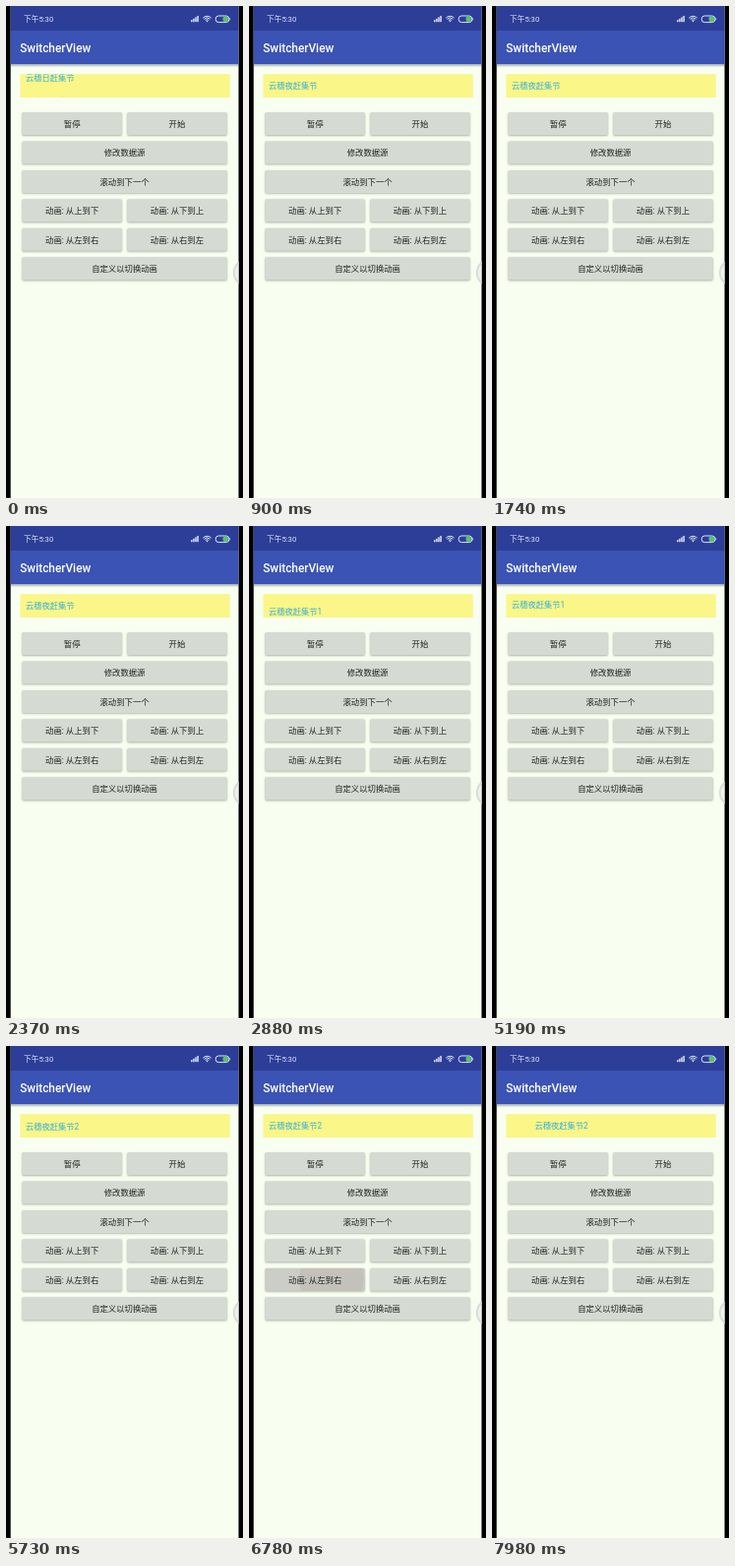
These frames come from a looping animation (241 by 500 pixels, 8000 ms). An HTML page with a canvas:

```html
<!DOCTYPE html>
<html lang="zh-CN">
<head>
<meta charset="utf-8">
<title>SwitcherView</title>
<style>
html, body { margin: 0; width: 100%; height: 100%; overflow: hidden; background: #000; }
canvas { display: block; width: 241px; height: 500px; }
</style>
</head>
<body>
<canvas id="stage" width="241" height="500"></canvas>
<script>
const ctx = document.getElementById('stage').getContext('2d');
const LOOP = 8000;
const FONT = 'Roboto, "Noto Sans CJK SC", "Noto Sans CJK", sans-serif';
const SCREEN = { x: 4.7, w: 231.8 };

// Rolling text: one switch every PERIOD ms, each taking SLIDE ms.
const FIRST = -270, PERIOD = 2700, SLIDE = 700;
const BOX = { x: 14.4, y: 69.2, w: 213.3, h: 23.8 };
const ITEMS = ['云穗日赶集节', '云穗夜赶集节', '云穗夜赶集节1', '云穗夜赶集节2', '云穗夜赶集节3'];

const ROWS = [
  ['暂停', '开始'],
  ['修改数据源'],
  ['滚动到下一个'],
  ['动画: 从上到下', '动画: 从下到上'],
  ['动画: 从左到右', '动画: 从右到左'],
  ['自定义以切换动画']
];
const ROW_TOP = 108, ROW_STEP = 29.45;
const TAPS = [
  { row: 1, x: 90, start: 1860, spread: 110 },
  { row: 4, x: 84, start: 6560, spread: 66 }
];
const TAP_TIME = 500;

const clamp = v => Math.max(0, Math.min(1, v));
const ease = v => (1 - Math.cos(Math.PI * clamp(v))) / 2;

function rect(x, y, w, h, color) {
  ctx.fillStyle = color;
  ctx.fillRect(x, y, w, h);
}

function band(y, h, color) {
  rect(SCREEN.x, y, SCREEN.w, h, color);
}

function round(x, y, w, h, r) {
  ctx.beginPath();
  ctx.roundRect(x, y, w, h, r);
}

function text(str, x, y, size, color, align = 'left', weight = 400) {
  ctx.font = `${weight} ${size}px ${FONT}`;
  ctx.textAlign = align;
  ctx.textBaseline = 'alphabetic';
  ctx.fillStyle = color;
  ctx.fillText(str, x, y);
}

function statusBar() {
  const white = '#dfe4f5';
  band(0, 25, '#2c3e98');
  text('下午5:30', 18, 16, 7.7, '#e4e8f6');

  for (let i = 0; i < 4; i++) {
    const h = 2 + i * 1.4;
    rect(188 + i * 2.1, 16.2 - h, 1.5, h, white);
  }

  ctx.strokeStyle = white;
  ctx.lineWidth = 1;
  for (const r of [2.2, 4, 5.7]) {
    ctx.beginPath();
    ctx.arc(204.5, 16, r, -Math.PI * 0.77, -Math.PI * 0.23);
    ctx.stroke();
  }
  ctx.beginPath();
  ctx.arc(204.5, 15.5, 0.8, 0, 7);
  ctx.fillStyle = white;
  ctx.fill();

  round(213.2, 10, 13.6, 6.6, 3);
  ctx.stroke();
  round(220.5, 10.6, 5.6, 5.4, 2);
  ctx.fillStyle = '#58c26c';
  ctx.fill();
  rect(227.3, 12.2, 0.8, 2.2, white);
}

function header() {
  statusBar();
  band(25, 34, '#3b53b4');
  const shade = ctx.createLinearGradient(0, 59, 0, 62.5);
  shade.addColorStop(0, 'rgba(60,70,90,.45)');
  shade.addColorStop(1, 'rgba(60,70,90,0)');
  band(59, 3.5, shade);
  text('SwitcherView', 14.2, 46.6, 11.85, '#fff', 'left', 500);
}

function switcher(t) {
  const n = Math.floor((t - FIRST) / PERIOD);
  const p = ease((t - FIRST - n * PERIOD) / SLIDE);
  const sideways = n === 3;
  const slide = (str, k) => text(str,
    20 + (sideways ? k * BOX.w : 0),
    83.8 - (sideways ? 0 : k * BOX.h), 8.25, '#36b0d8');

  ctx.save();
  rect(BOX.x, BOX.y, BOX.w, BOX.h, '#faf688');
  ctx.beginPath();
  ctx.rect(BOX.x, BOX.y, BOX.w, BOX.h);
  ctx.clip();
  if (p < 1) slide(ITEMS[n], p);
  slide(ITEMS[n + 1], p - 1);
  ctx.restore();
}

function ripple(tap, y, t) {
  const age = (t - tap.start) / TAP_TIME;
  if (age < 0 || age > 1) return;
  const fade = clamp((1 - age) * 2.5) * clamp(age * 5);
  ctx.save();
  ctx.clip();
  rect(16, y, 209, 23, `rgba(90,60,50,${0.08 * fade})`);
  ctx.beginPath();
  ctx.arc(tap.x, y + 11.5, tap.spread * Math.sqrt(age) * 0.75, 0, 7);
  ctx.fillStyle = `rgba(110,70,60,${0.09 * fade})`;
  ctx.fill();
  ctx.restore();
}

function button(label, x, y, w, tap, t) {
  ctx.save();
  ctx.shadowColor = 'rgba(60,70,60,.42)';
  ctx.shadowBlur = 2.2;
  ctx.shadowOffsetY = 0.9;
  round(x, y, w, 23, 1.2);
  ctx.fillStyle = '#d5dad2';
  ctx.fill();
  ctx.restore();
  if (tap) ripple(tap, y, t);
  text(label, x + w / 2, y + 14.7, 8.35, '#20231f', 'center');
}

function buttons(t) {
  ROWS.forEach((labels, row) => {
    const w = labels.length === 2 ? 101.3 : 208.1;
    labels.forEach((label, col) => {
      const tap = col === 0 && TAPS.find(a => a.row === row);
      button(label, 16.5 + col * 106.8, ROW_TOP + row * ROW_STEP, w, tap, t);
    });
  });
}

function edgeHandle() {
  ctx.save();
  ctx.beginPath();
  ctx.rect(SCREEN.x, 240, SCREEN.w, 60);
  ctx.clip();
  ctx.beginPath();
  ctx.arc(245.3, 271, 13.5, 0, 7);
  ctx.fillStyle = '#f0f3ec';
  ctx.fill();
  ctx.strokeStyle = '#d9dcd8';
  ctx.lineWidth = 2;
  ctx.stroke();
  ctx.restore();
}

function draw(t) {
  rect(0, 0, 241, 500, '#000');
  band(0, 500, '#f8fff1');
  header();
  switcher(t);
  buttons(t);
  edgeHandle();
}

function tick() {
  const t = performance.now() % LOOP;
  draw(t < 90 ? 0 : t);
  requestAnimationFrame(tick);
}
tick();
</script>
</body>
</html>
```
